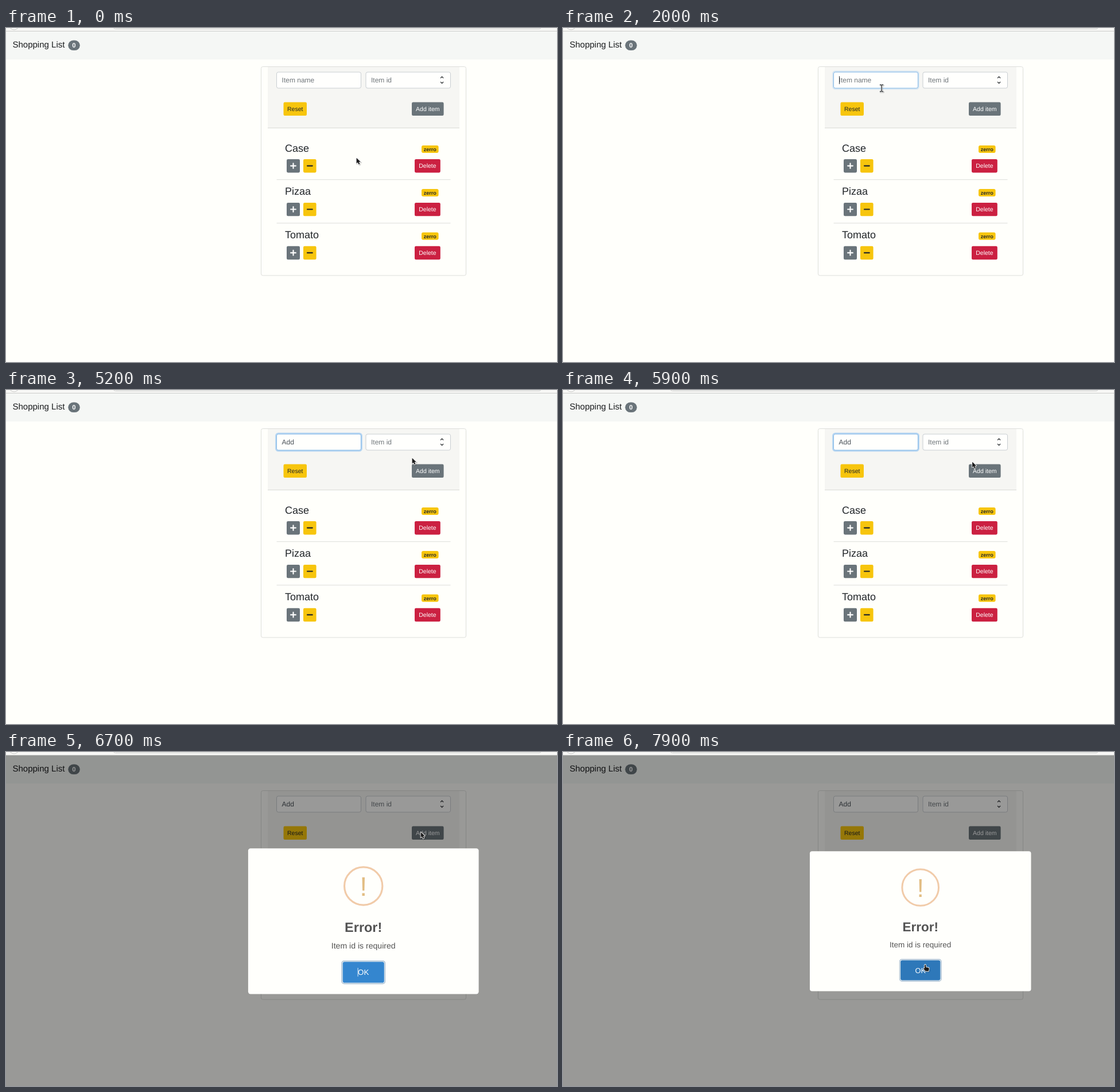
An HTML page that plays this animation: 960x583 px, repeating every 8 s.

```html
<!DOCTYPE html>
<html lang="en">
<head>
<meta charset="utf-8">
<title>Shopping List</title>
<style>
  html, body { margin: 0; width: 100%; height: 100%; overflow: hidden; background: #fffffb; }
  svg { display: block; width: 960px; height: 583px; }
  text { font-family: "Liberation Sans", Arial, sans-serif; text-rendering: geometricPrecision; white-space: pre; }
</style>
</head>
<body>
<svg id="stage" viewBox="0 0 960 583" xmlns="http://www.w3.org/2000/svg"></svg>
<script>
const LOOP = 8000, STEP = 100;
const GRAY = '#6a747a', GRAY_HOVER = '#576066', YELLOW = '#f7c50d', RED = '#cb2041';
const INK = '#212529', LINE = '#dddedb', FIELD_LINE = '#c9ced2', HINT = '#70767b';
const stage = document.getElementById('stage');

function el(tag, attrs, parent = stage) {
  const node = document.createElementNS('http://www.w3.org/2000/svg', tag);
  set(node, attrs);
  parent.appendChild(node);
  return node;
}
function set(node, attrs) {
  for (const key in attrs) node.setAttribute(key, attrs[key]);
}
function show(node, on) {
  node.setAttribute('visibility', on ? 'visible' : 'hidden');
}
function box(x, y, right, bottom, fill, rx = 0, extra = {}, parent = stage) {
  return el('rect', { x, y, width: right - x, height: bottom - y, fill, rx, ...extra }, parent);
}
function label(str, x, y, size, fill, extra = {}, parent = stage) {
  const node = el('text', { x, y, 'font-size': size, fill, ...extra }, parent);
  node.textContent = str;
  return node;
}
const MID = { 'text-anchor': 'middle' };
const BOLD_MID = { 'text-anchor': 'middle', 'font-weight': 700 };

function button(str, x, y, right, fill, ink) {
  const rect = box(x, y, right, y + 23.4, fill, 2.3);
  if (str) label(str, (x + right) / 2, y + 15.4, 10.5, ink, MID);
  return rect;
}
function sign(x, y, ink, plus) {
  const d = `M${x - 4.4} ${y}h8.8` + (plus ? `M${x} ${y - 4.4}v8.8` : '');
  el('path', { d, stroke: ink, 'stroke-width': 2.1, 'stroke-linecap': 'round' });
}

// Browser edge and page header
box(0, 0, 960, 583, '#fffffb');
box(0, 6, 960, 55, '#f5f7f5');
label('Shopping List', 11.5, 34.3, 15, '#1b1d1f');
box(108.3, 21.6, 128.8, 39, GRAY, 8.7);
label('0', 118.5, 34.2, 11.25, '#fff', BOLD_MID);

// Card with the form
box(444.5, 67.5, 801.5, 432, '#fffffb', 3, { stroke: LINE });
box(456, 68, 790, 174.5, '#f6f6f3');
el('path', { d: 'M456 174.5H790', stroke: '#d9dad7' });

const glow = box(470.3, 75.8, 619.7, 106.2, 'none', 4, { stroke: '#b5d5f2', 'stroke-width': 2.4 });
const nameField = box(471.5, 77, 618.5, 105, '#fffffd', 3, { stroke: FIELD_LINE });
const nameText = label('', 480.6, 95, 12, HINT);
const fieldCaret = box(0, 84, 1, 98, '#30363b');
box(627, 77, 774.5, 105, '#fffffd', 3, { stroke: FIELD_LINE });
label('Item id', 636, 95, 12, HINT);
el('path', { d: 'M757.1 87.6l2.5-2.5l2.5 2.5M757.1 93.9l2.5 2.5l2.5-2.5', fill: 'none', stroke: '#3a3e40', 'stroke-width': 1.4 });

button('Reset', 483.5, 129.6, 524, YELLOW, INK);
const addButton = button('Add item', 707, 129.6, 762.6, GRAY, '#fff');

['Case', 'Pizaa', 'Tomato'].forEach((name, i) => {
  const y = i * 75.9;
  label(name, 486, 215.5 + y, 18, INK);
  box(724, 205 + y, 753.6, 218 + y, YELLOW, 3);
  label('zerro', 738.8, 214.7 + y, 9, INK, BOLD_MID);
  button('', 489, 229 + y, 512, GRAY);
  sign(500.5, 240.6 + y, '#fff', true);
  button('', 518, 229 + y, 540.6, YELLOW);
  sign(529.4, 240.6 + y, INK, false);
  button('Delete', 712, 229 + y, 756.8, RED, '#fff');
  if (i < 2) el('path', { d: `M471.5 ${264.7 + y}H774.5`, stroke: LINE });
});
const strayCaret = box(749.8, 234.5, 750.8, 247, '#fff');

// Dialog
const shade = box(0, 6, 960, 583, '#000', 0, { opacity: 0.4 });
const dialog = el('g', {});
box(430, 173.3, 815.5, 417.4, '#fffffc', 4, {}, dialog);
el('circle', { cx: 622.7, cy: 236.5, r: 31.8, fill: 'none', stroke: '#f1cba9', 'stroke-width': 3 }, dialog);
label('!', 622.7, 252.6, 45, '#e2bd83', MID, dialog);
label('Error!', 622.7, 313.4, 22.5, '#545454', BOLD_MID, dialog);
label('Item id is required', 622.7, 341.2, 13.5, '#545454', MID, dialog);
box(586.6, 361.9, 658.9, 400, 'none', 4, { stroke: '#a9bfd3', 'stroke-width': 1.5 }, dialog);
const okButton = box(588.1, 363.4, 657.4, 398.5, '#3486cf', 3, {}, dialog);
label('OK', 622.7, 385.6, 12.75, '#fff', MID, dialog);
const okCaret = box(613, 373.5, 614, 388, '#d9e8f5', 0, {}, dialog);

// Strip of browser chrome above the page
box(0, 0, 960, 5.5, '#f8f8f6');
el('path', { d: 'M0 5.5H960', stroke: '#cbccca' });
el('path', { d: 'M187.5 -4v2.5q0 3 3 3H929q3 0 3-3V-4', fill: '#fefefd', stroke: '#c6c7c5' });
el('circle', { cx: 14, cy: -6, r: 9, fill: '#fdfdfc', stroke: '#c6c7c5' });

// Pointers, each with its hot spot at 0,0
const pointer = el('g', { 'stroke-linejoin': 'round' });
function pointerShape(d, fill, stroke, width) {
  const g = el('g', {}, pointer);
  el('path', { d, fill: 'none', stroke: '#000', 'stroke-width': width + 0.6, opacity: 0.18, transform: 'translate(.9 1.1)' }, g);
  el('path', { d, fill, stroke, 'stroke-width': width, 'paint-order': 'stroke' }, g);
  return g;
}
const arrow = pointerShape('M.6 .8V10.4L2.9 8.4L4.6 12.2L6.5 11.3L4.8 7.7H7.9Z', '#1c1c1c', '#fff', 1.6);
const hand = pointerShape('M-1 1Q0 -.6 1.1 1V4.6L5.6 5.4Q6.9 5.8 6.8 7.4L6 11.6H.6L-3 7.3Q-3.2 5.8 -1 6.5Z', '#1c1c1c', '#fff', 1.7);
const beam = pointerShape('M-3 -6.4H-.8L0 -5.8L.8 -6.4H3V-5.1H.7V5.1H3V6.4H.8L0 5.8L-.8 6.4H-3V5.1H-.7V-5.1H-3Z', '#3c3f41', '#e6e7e6', 1.4);

// time, x, y
const TRACK = [
  [0, 610, 226], [1000, 610, 226], [1200, 598, 190], [1500, 556, 99], [1600, 555, 105],
  [2200, 555, 105], [2300, 613, 101], [2400, 575, 98], [2500, 552, 97],
  [4900, 552, 97], [5000, 590, 100], [5100, 662, 111], [5200, 707, 118], [5800, 710, 121],
  [6200, 720, 136], [6500, 722, 139], [6800, 722, 139], [7000, 700, 215], [7200, 664, 330],
  [7400, 647, 386], [7600, 647, 386], [7700, 608, 381], [7800, 622, 374], [7900, 631, 371], [8000, 631, 371]
];
function pointerAt(t) {
  const i = Math.max(1, TRACK.findIndex(k => k[0] >= t));
  const [t0, x0, y0] = TRACK[i - 1], [t1, x1, y1] = TRACK[i];
  const p = (t - t0) / (t1 - t0);
  return [x0 + (x1 - x0) * p, y0 + (y1 - y0) * p];
}
const within = (x, y, l, t, r, b) => x >= l && x <= r && y >= t && y <= b;
const during = (t, from, to) => t >= from && t < to;

function draw(t) {
  const modal = t >= 6700;
  const [x, y] = pointerAt(t);
  const overName = !modal && within(x, y, 471, 76, 619, 106);
  const overAdd = !modal && within(x, y, 707, 129, 763, 153);
  const overOk = modal && within(x, y, 588, 363, 658, 399);
  set(pointer, { transform: `translate(${x} ${y})` });
  show(beam, overName);
  show(hand, overAdd || overOk);
  show(arrow, !overName && !overAdd && !overOk);

  const focus = modal ? 0 : Math.min(1, Math.max(0, (t - 1900) / 200));
  set(glow, { opacity: focus });
  set(nameField, { stroke: focus ? '#84b8e6' : FIELD_LINE });

  const typed = 'Add'.slice(0, (t >= 3600) + (t >= 4000) + (t >= 4300));
  nameText.textContent = typed || 'Item name';
  set(nameText, { fill: typed ? '#495057' : HINT });
  set(fieldCaret, { x: [481, 488.4, 495.3, 502][typed.length] });
  show(fieldCaret, during(t, 1900, 3100) || during(t, 3600, 5000));
  show(strayCaret, during(t, 1800, 1900) || during(t, 6500, 6700));

  set(addButton, { fill: overAdd ? GRAY_HOVER : GRAY });
  set(okButton, { fill: overOk ? '#2e78b9' : '#3486cf' });
  const scale = t < 6800 ? 1.042 : t < 6900 ? 0.957 : 1;
  set(dialog, { transform: `translate(622.75 295.4) scale(${scale}) translate(-622.75 -295.4)` });
  show(shade, modal);
  set(dialog, { display: modal ? 'inline' : 'none' });
  show(okCaret, during(t, 6700, 6800));
}

const start = performance.now();
function tick() {
  const t = (performance.now() - start) % LOOP;
  draw(Math.floor(t / STEP) * STEP);
  requestAnimationFrame(tick);
}
tick();
</script>
</body>
</html>
```
